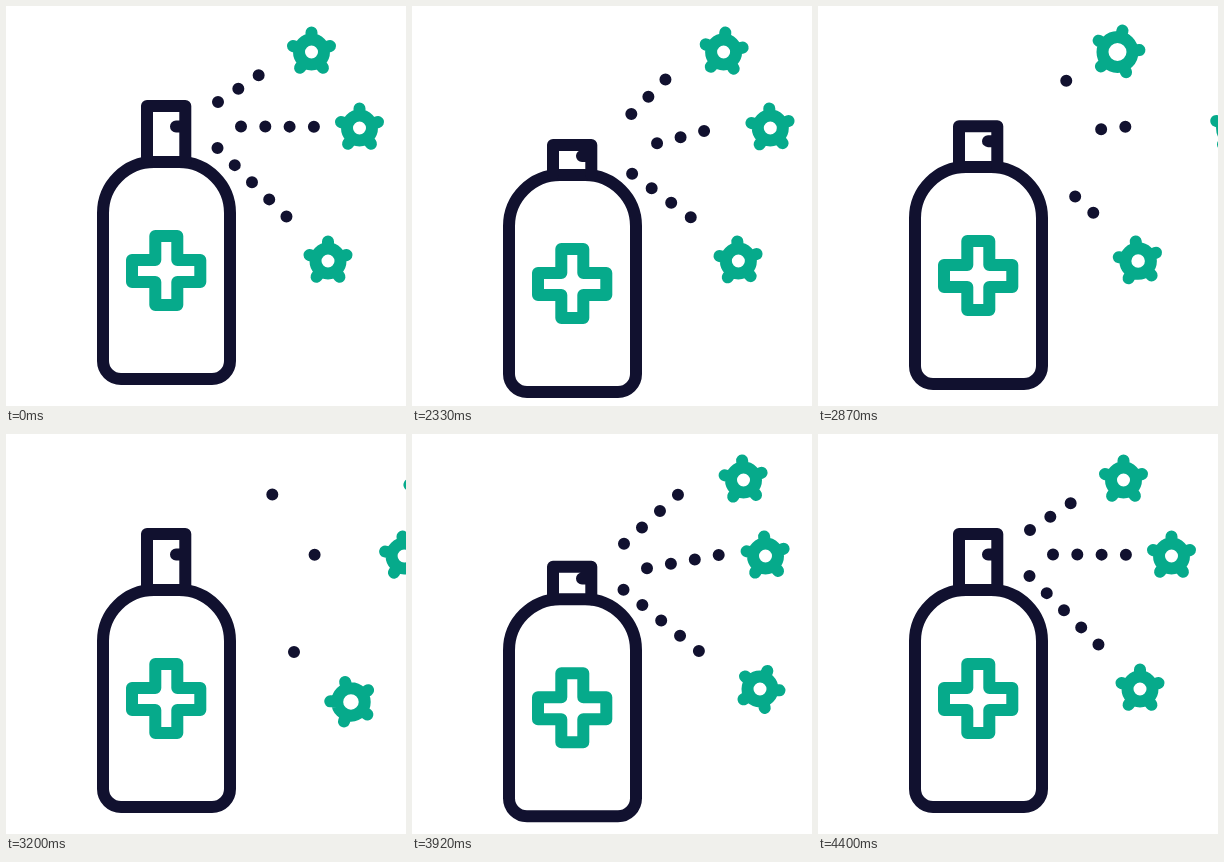
Animation of 400 by 400 pixels, one loop 4.43 s. Source, as an HTML page:

```html
<!DOCTYPE html>
<html lang="en">
<head>
<meta charset="utf-8">
<title>Disinfectant spray</title>
<style>
  html, body { margin: 0; width: 100%; height: 100%; overflow: hidden; background: #fff; }
  svg { display: block; width: 100vw; height: 100vh; }
  .line { fill: none; stroke-width: 12; stroke-linecap: round; stroke-linejoin: round; }
  .navy { stroke: #11112f; }
  .green { stroke: #06aa8b; }
</style>
</head>
<body>
<svg viewBox="0 0 400 400">
  <g id="bottle">
    <path class="line navy" d="M148 156H173A51 51 0 0 1 224 207V355A18 18 0 0 1 206 373H115A18 18 0 0 1 97 355V207A51 51 0 0 1 148 156Z"/>
    <path class="line green" d="M149.3 230H171.3V254H194.3V276H171.3V299H149.3V276H126V254H149.3Z"/>
  </g>
  <path id="nozzle" class="line navy"/>
  <path id="spray" class="line navy"/>
  <g id="germs"></g>
</svg>
<script>
const LOOP = 4430, HOLD = 2030, STEP = 30, GAP = 24.3;
const $ = id => document.getElementById(id);
const ease = x => Math.sin(Math.PI / 2 * Math.min(1, Math.max(0, x))) ** 2;
const linear = x => x;

// value of a [time, value] track at u
function track(keys, u, curve) {
  if (u <= keys[0][0]) return keys[0][1];
  for (let i = 1; i < keys.length; i++) {
    const [a, from] = keys[i - 1], [b, to] = keys[i];
    if (u <= b) return from + (to - from) * curve((u - a) / (b - a));
  }
  return keys[keys.length - 1][1];
}

const jets = [
  { from: [212, 96], to: [266.3, 60.4] },
  { from: [235, 120.5], to: [308.6, 120.7] },
  { from: [211.5, 142], to: [288, 218] }
];

// sway, then fly off along dir between leave and gone, then slide back until home
const germs = [
  { x: 305.5, y: 46, dir: [0.85, -0.53], leave: 870, gone: 1200, home: 2400, grow: 0.2,
    sway: [[0, 0], [430, 7], [870, -6]],
    spin: [[0, 0], [330, 5], [870, 13], [1200, 40], [1201, -14], [1560, -8], [1920, -4], [2400, 0]] },
  { x: 353.5, y: 122, dir: [1, 0], leave: 620, gone: 960, home: 1867, grow: 0.1,
    sway: [[0, 0], [430, 5.5], [620, -6]],
    spin: [[0, 0], [330, -3], [870, 2], [1560, -12], [1920, -4], [2400, 0]] },
  { x: 322, y: 255, dir: [0.9, 0.43], leave: 1080, gone: 1330, home: 2400, grow: 0.1,
    sway: [[0, 0], [430, 5], [1080, -4]],
    spin: [[0, 0], [330, -3], [870, -7], [1330, -20], [1331, 44], [1560, 33], [1920, 22], [2400, 0]] }
];

for (const g of germs) {
  g.el = document.createElementNS("http://www.w3.org/2000/svg", "path");
  g.el.setAttribute("class", "line green");
  $("germs").append(g.el);
}

function germPath(x, y, size, spin) {
  const r = 12.5 * size, arm = r + 7;
  let d = `M${x - r} ${y}a${r} ${r} 0 1 1 ${2 * r} 0a${r} ${r} 0 1 1 ${-2 * r} 0Z`;
  for (let i = 0; i < 5; i++) {
    const a = (spin + 72 * i - 90) * Math.PI / 180, c = Math.cos(a), s = Math.sin(a);
    d += `M${x + r * c} ${y + r * s}L${x + arm * c} ${y + arm * s}`;
  }
  return d;
}

function drawGerm(g, u) {
  let { x, y } = g, size = 1;
  if (u < g.gone) {
    const away = 130 * Math.max(0, (u - g.leave) / (g.gone - g.leave)) ** 2;
    x += track(g.sway, u, ease) + g.dir[0] * away;
    y += g.dir[1] * away;
    size += g.grow * ease((u - g.leave + 300) / 300);
  } else {
    x += 26 * (Math.max(0, g.home - u) / 480) ** 1.64;
  }
  g.el.setAttribute("d", germPath(x, y, size, track(g.spin, u, linear)));
}

function drawBottle(p, push) {
  const drop = 14 * push;
  const squash = 26 * track([[0, 0], [200, 1], [600, 1], [1200, 0]], p, ease);
  const base = 156 + drop, top = 100 + drop + squash;
  const tip = base - 35.5 * (base - top) / 56;
  $("bottle").setAttribute("transform", `translate(0 ${drop})`);
  $("nozzle").setAttribute("d", `M141 ${base}V${top}H179.3V${base}M170 ${tip}H179.3`);
}

function drawSpray(u, push) {
  const phase = u % 240 / 240 * GAP;
  let trim = 0;
  if (u > 200 && u <= 1200) trim = ((u - 200) / 1000) ** 2;
  else if (u > 1200 && u < 1630) trim = ((1630 - u) / 430) ** 2;
  let d = "";
  for (const { from, to } of jets) {
    const x = from[0], y = from[1] + 21 * push;
    const dx = to[0] - x, dy = to[1] - y, len = Math.hypot(dx, dy);
    for (let s = trim * len + phase; s <= len; s += GAP)
      d += `M${x + dx * s / len} ${y + dy * s / len}h.01`;
  }
  $("spray").setAttribute("d", d);
}

function draw(time) {
  const t = time % LOOP;
  const u = t < HOLD ? 0 : (Math.floor((t - HOLD) / STEP) + 1) * STEP;
  const p = u % 1200;
  const push = track([[0, 0], [400, 1], [1200, 0]], p, ease);
  drawBottle(p, push);
  drawSpray(u, push);
  for (const g of germs) drawGerm(g, u);
}

const start = performance.now();
function tick() {
  draw(performance.now() - start);
  requestAnimationFrame(tick);
}
tick();
</script>
</body>
</html>
```
